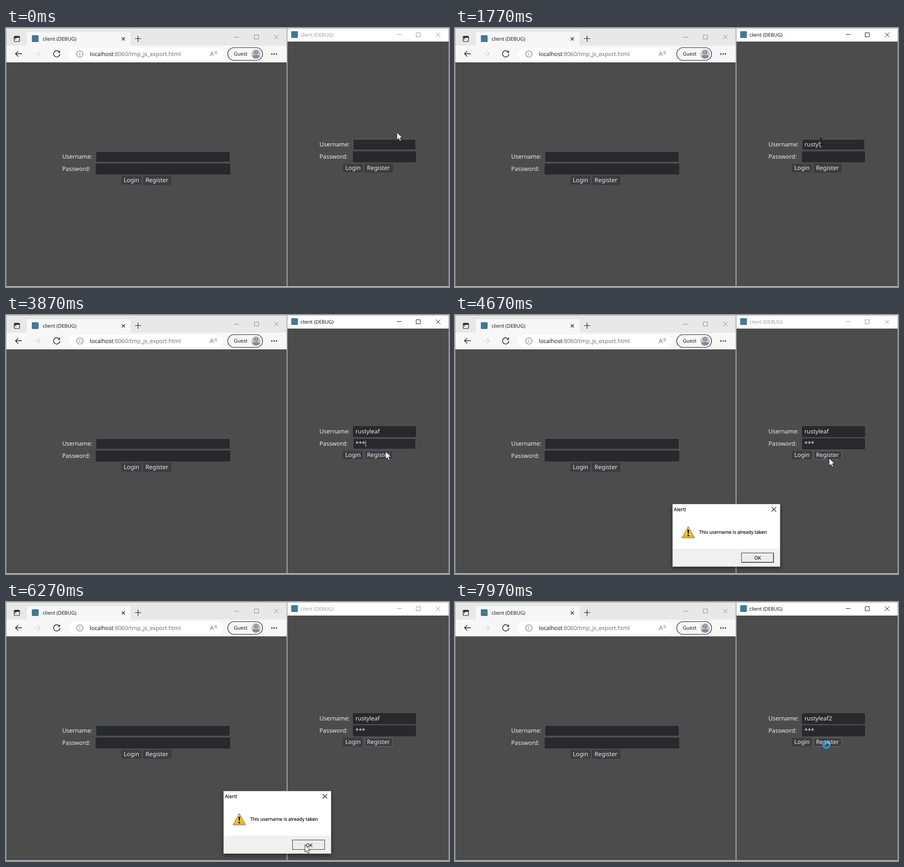
An HTML page for the animation above (8000 ms loop, 978 by 573 pixels).

```html
<!DOCTYPE html>
<html lang="en">
<head>
<meta charset="utf-8">
<title>Client login</title>
<style>
  html, body { margin: 0; width: 100%; height: 100%; overflow: hidden; background: #4c4c4c; }
  svg { display: block; width: 978px; height: 573px; }
  text { font-family: "Open Sans", sans-serif; font-size: 11px; fill: #0c0c0c; text-rendering: geometricPrecision; white-space: pre; }
  .form text { font-family: "Noto Sans", sans-serif; font-size: 13px; fill: #ececec; }
  .line { fill: none; stroke: #161616; stroke-width: 1.2; }
  .crisp { stroke: #0c0c0c; stroke-width: .25; }
</style>
</head>
<body>
<svg id="stage" viewBox="0 0 978 573">
  <defs>
    <linearGradient id="warn" x2="0" y2="1">
      <stop offset="0" stop-color="#ffe95a"/><stop offset="1" stop-color="#ecb400"/>
    </linearGradient>
    <filter id="blur" x="-20%" y="-20%" width="140%" height="140%"><feGaussianBlur stdDeviation="5"/></filter>
  </defs>
  <rect width="978" height="573" fill="#4c4c4c"/>

  <g id="browser">
    <rect width="620" height="40" fill="#e8e8e9"/>
    <rect y="39" width="620" height="37" fill="#f7f7f7"/>
    <path d="M41 40q5 0 5-5V14q0-5 5-5H270q5 0 5 5V35q0 5 5 5Z" fill="#f7f7f7"/>
    <rect x="139" y="44" width="341" height="27" rx="13.5" fill="#fff"/>
    <g class="line">
      <rect x="18" y="18" width="12" height="12" rx="2.5"/>
      <path d="M18 20H30" stroke-width="3"/><path d="M21.5 20V24H18"/>
      <path d="M255.5 20.5l7 7m0-7l-7 7M285 23.5H298.5M291.5 17V30.5"/>
      <path d="M35 57H21m6-6l-6 6l6 6" stroke-width="1.4"/>
      <path d="M62 57H76m-6-6l6 6l-6 6" stroke="#d2d2d2"/>
      <path d="M117.2 52.5A7 7 0 1 0 119 57.5M118.5 50V54H114.5" stroke-width="1.4"/>
      <circle cx="163" cy="57.5" r="7" stroke="#6c6c6c"/>
      <path d="M163 56.5V61M163 53.5V55" stroke="#6c6c6c"/>
      <path d="M461 52q2 2 0 5M463.5 50.5q3 4 0 8" stroke="#6c6c6c" stroke-width="1"/>
      <rect x="489.5" y="43.5" width="77" height="28" rx="14"/>
    </g>
    <text x="81" y="28">client (DEBUG)</text>
    <text x="185" y="62" style="font-size:12.48px">localhost<tspan fill="#666">:8060/tmp_js_export.html</tspan></text>
    <text x="450" y="62" style="font-size:13.5px;fill:#6c6c6c">A</text>
    <text x="503" y="61">Guest</text>
    <circle cx="552" cy="57.5" r="10.5" fill="#c8c8ce"/>
    <path d="M544 64q0-4 4-4H556q4 0 4 4a10.500 10.500 0 0 1-16 0Z" fill="#8a8a98"/>
    <circle cx="552" cy="54" r="5" fill="#8a8a98"/>
    <text x="549.8" y="57.5" style="font-size:9px;fill:#fff">?</text>
    <g fill="#161616"><circle cx="587" cy="57.5" r="1.4"/><circle cx="592" cy="57.5" r="1.4"/><circle cx="597" cy="57.5" r="1.4"/></g>
    <rect x="57" y="16" width="15" height="15" rx="2" fill="#437896"/>
    <path d="M504 20.5H514M548.5 15.5h9v9h-9ZM592 15l10 10m0-10l-10 10" fill="none" stroke="#8c8c8e"/>
    <path d="M.5 571V.5H620" fill="none" stroke="#a2a2a4"/>
  </g>

  <g id="client">
    <rect x="621" width="357" height="30" fill="#fff"/>
    <rect x="629.5" y="7" width="15" height="15" rx="2" fill="#437896"/>
    <text id="title" x="650" y="19" style="font-size:10.8px">client (DEBUG)</text>
    <path id="controls" d="M863 14.5H873M905.5 10.5h9v9h-9ZM949 10l10 10m0-10l-10 10" fill="none"/>
    <path d="M620.5 0V572" stroke="#aeaeb0" stroke-width="2"/>
    <path d="M621 .5H977.5V571.5" fill="none" stroke="#a2a2a4"/>
    <path d="M0 571.5H978" stroke="#929294"/>
    <path d="M0 572.5H978" stroke="#d8d8d8"/>
  </g>

  <g id="forms" class="form"></g>

  <g id="dialog">
    <rect x="480" y="422" width="238" height="138" fill="#000" opacity=".5" filter="url(#blur)"/>
    <rect x="480" y="418" width="238" height="139" fill="#fff"/>
    <rect x="480" y="517" width="238" height="40" fill="#f0f0f0"/>
    <rect x="480.5" y="418.5" width="237" height="138" fill="none" stroke="#777" stroke-opacity=".45"/>
    <text class="crisp" x="483" y="433.5">Alert!</text>
    <path class="line" d="M699 425l10 10m0-10l-10 10"/>
    <path d="M515 468.5L528.5 493H501.5Z" fill="url(#warn)" stroke="#a39a7c" stroke-width="2" stroke-linejoin="round"/>
    <path d="M513 475h4l-.8 9h-2.4Z" fill="#1c1c1c"/><circle cx="515" cy="488" r="2" fill="#1c1c1c"/>
    <text class="crisp" x="539" y="484" style="font-size:10.39px">This username is already taken</text>
    <rect x="632.5" y="526.5" width="71" height="21" fill="#ececec" stroke="#303036"/>
    <path id="bevel" d="M634 546.5H702.5V528" fill="none" stroke="#70707a"/>
    <text id="ok" class="crisp" x="661" y="541" style="font-size:10.39px">OK</text>
  </g>

  <g id="pointer">
    <path id="arrow" d="M0 0V16.5L3.9 13L6.5 19L9.3 17.8L6.7 12H12Z" fill="#fff" stroke="#18181c"/>
    <path id="beam" d="M-4 -7.5H-1L0 -6.5L1 -7.5H4M-4 7.5H-1L0 6.5L1 7.5H4M0 -7V7" fill="none" stroke="#08080a" stroke-width="1.2"/>
    <g id="busy" fill="none" stroke-width="4">
      <circle r="7" stroke="#2197dc"/>
      <path id="spark" d="M0 -7A7 7 0 0 1 7 0" stroke="#5bbcf0"/>
    </g>
  </g>
</svg>
<script>
const LOOP = 8000;
const $ = id => document.getElementById(id);

function add(parent, tag, attrs, content = "") {
  const el = document.createElementNS("http://www.w3.org/2000/svg", tag);
  for (const key in attrs) el.setAttribute(key, attrs[key]);
  el.textContent = content;
  return parent.appendChild(el);
}

function makeForm(x, y, fieldW, buttonX) {
  const root = $("forms");
  const box = (bx, by, width, height, fill) =>
    add(root, "rect", { x: bx + .5, y: by + .5, width: width - 1, height: height - 1, rx: 1.5, fill });
  const label = (lx, ly, str) => add(root, "text", { x: lx, y: ly }, str);
  const field = (name, dy) => {
    label(x, y + dy + 16, name);
    return { box: box(x + 74, y + dy, fieldW, 24, "#29292c"), text: label(x + 79.5, y + dy + 15.5, "") };
  };
  const user = field("Username:", 0), pass = field("Password:", 27);
  box(buttonX, y + 54, 45, 20, "#3d3d41");
  const register = box(buttonX + 49, y + 54, 62, 20, "#3d3d41");
  label(buttonX + 6, y + 67.5, "Login");
  label(buttonX + 54, y + 67.5, "Register");
  const caret = add(root, "rect", { width: 1, height: 14, fill: "#eeeef0" });

  return (focus, name = "", stars = "", showCaret = false, hover = false) => {
    user.text.textContent = name;
    pass.text.textContent = stars;
    user.box.setAttribute("stroke", focus === "user" ? "#3e6070" : "#242426");
    pass.box.setAttribute("stroke", focus === "pass" ? "#3e6070" : "#242426");
    register.setAttribute("stroke", focus === "register" ? "#6c6c7c" : hover ? "#55555e" : "#39393d");
    const active = focus === "pass" ? pass : user;
    caret.setAttribute("x", x + 80 + active.text.getComputedTextLength());
    caret.setAttribute("y", y + (focus === "pass" ? 32 : 5));
    caret.style.display = showCaret && focus !== "register" ? "" : "none";
  };
}

const browserForm = makeForm(124, 273, 297, 254);
const clientForm = makeForm(692, 246, 139, 743);

const USER = "rustyleaf2";
const userKeys = [1070, 1230, 1430, 1530, 1630, 1770, 1970, 2130, 2330, 7330];
const passKeys = [2900, 3100, 3300];
const typed = (str, keys, t) => str.slice(0, keys.filter(k => k <= t).length);

// time, x, y
const path = [
  [30, 863, 231], [500, 821, 252], [1430, 821, 251], [1700, 808, 251],
  [3500, 808, 251], [3870, 838, 302], [4130, 826, 317], [4670, 826, 317],
  [5470, 646, 522], [5670, 658, 542], [6000, 658, 542], [6200, 660, 537],
  [6370, 660, 537], [6800, 843, 260], [7400, 843, 260], [7700, 820, 316]
];

function pointerAt(t) {
  const i = path.findIndex(p => p[0] > t);
  if (i === 0) return path[0].slice(1);
  if (i < 0) return path[path.length - 1].slice(1);
  const [t0, x0, y0] = path[i - 1], [t1, x1, y1] = path[i];
  const u = (t - t0) / (t1 - t0), e = u * u * (3 - 2 * u);
  return [x0 + (x1 - x0) * e, y0 + (y1 - y0) * e];
}

function render(t) {
  const within = (a, b) => t >= a && t < b;
  const show = (id, on) => { $(id).style.display = on ? "" : "none"; };

  const open = within(4230, 6370);
  const active = t >= 930 && !open;
  $("title").style.fill = active ? "#000" : "#949496";
  $("controls").setAttribute("stroke", active ? "#101010" : "#929294");

  const [x, y] = pointerAt(t);
  const inside = (x0, y0, x1, y1) => x >= x0 && x < x1 && y >= y0 && y < y1;
  const focus = within(2470, 4200) ? "pass" : within(4200, 6900) || t >= 7730 ? "register" : "user";
  browserForm("user");
  clientForm(focus, typed(USER, userKeys, t), typed("***", passKeys, t), active, !open && inside(792, 300, 854, 320));

  show("dialog", open);
  $("dialog").style.opacity = Math.min(1, Math.max(0, (t - 4210) / 120));
  const pressed = within(6200, 6370);
  show("bevel", !pressed);
  $("ok").setAttribute("transform", pressed ? "translate(1 1)" : "");

  const busy = t >= 7830;
  const beam = !busy && inside(766, 246, 905, 297);
  show("busy", busy);
  show("beam", beam);
  show("arrow", !busy && !beam);
  $("spark").setAttribute("transform", `rotate(${t * .36})`);
  $("pointer").setAttribute("transform", `translate(${Math.round(x)} ${Math.round(y)})`);
}

const start = performance.now();
function tick() {
  render((performance.now() - start) % LOOP);
  requestAnimationFrame(tick);
}
tick();
</script>
</body>
</html>
```
